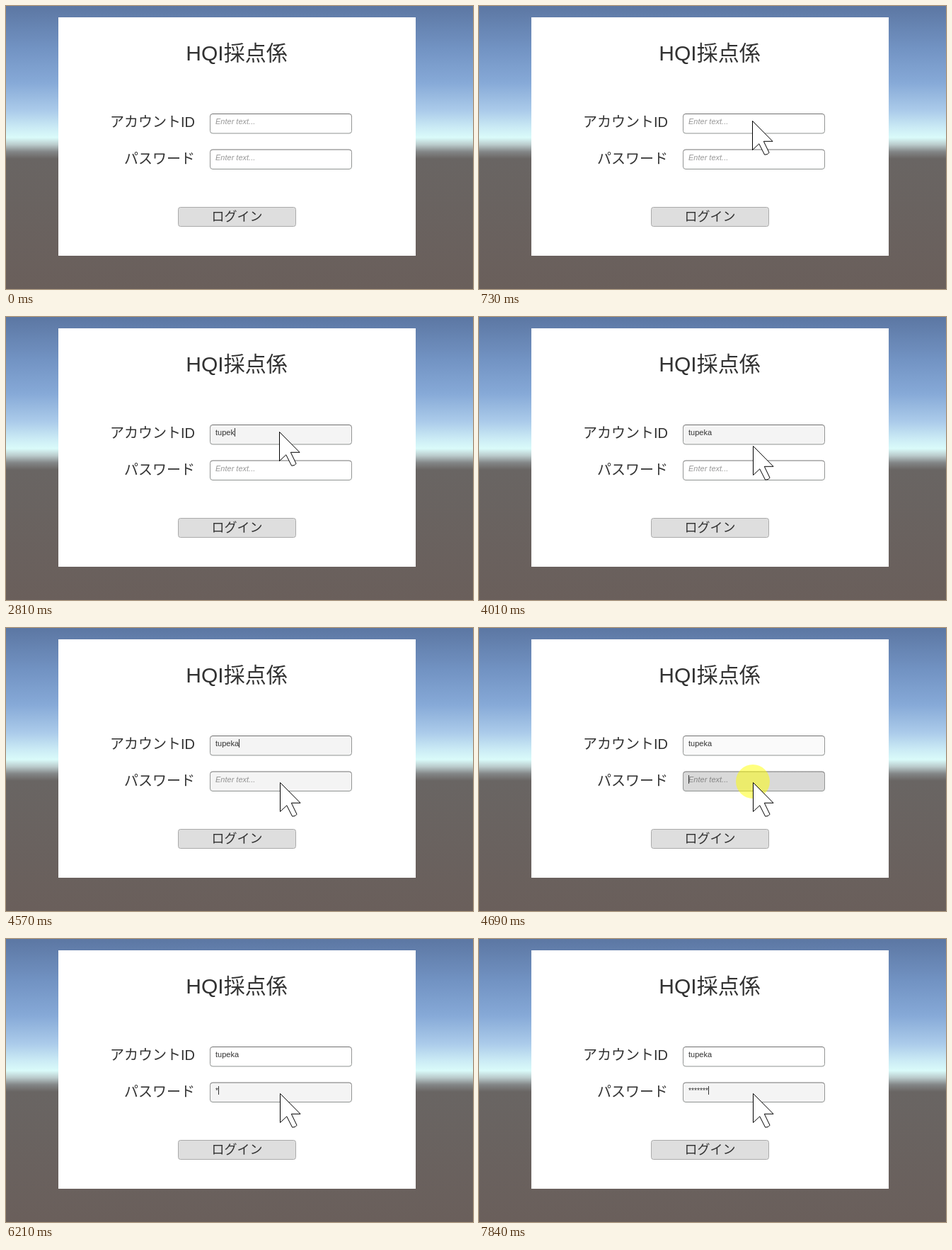
Write an HTML page that moves like this. It is 660 px wide and 400 px high and loops after 8000 ms.

```html
<!DOCTYPE html>
<html lang="ja">
<head>
<meta charset="utf-8">
<title>ログイン</title>
<style>
  html, body { margin: 0; width: 100%; height: 100%; overflow: hidden; }
  svg { display: block; width: 660px; height: 400px; }
  text { font-family: "Liberation Sans", "Noto Sans CJK JP", "Noto Sans CJK", sans-serif; fill: #323232; }
  .title { font-size: 30px; }
  .label { font-size: 20px; text-anchor: end; }
  .button { font-size: 18px; }
  .title, .button { text-anchor: middle; }
  .entry, .hint { font-size: 11px; }
  .hint { font-style: italic; fill-opacity: .5; }
  .mask { font-size: 10.3px; }
</style>
</head>
<body>
<svg viewBox="0 0 660 400">
  <defs>
    <linearGradient id="sky" x2="0" y2="1">
      <stop offset="0" stop-color="#5c77a3"/>
      <stop offset=".15" stop-color="#7293c3"/>
      <stop offset=".27" stop-color="#86a9d7"/>
      <stop offset=".37" stop-color="#abcbea"/>
      <stop offset=".43" stop-color="#cbebf5"/>
      <stop offset=".465" stop-color="#dafbfa"/>
      <stop offset=".49" stop-color="#bacbcc"/>
      <stop offset=".515" stop-color="#838687"/>
      <stop offset=".54" stop-color="#696563"/>
      <stop offset="1" stop-color="#6a5f5b"/>
    </linearGradient>
    <linearGradient id="edge" x2="0" y2="1">
      <stop offset="0" stop-color="#717171"/>
      <stop offset=".2" stop-color="#979797"/>
      <stop offset="1" stop-color="#8f9391"/>
    </linearGradient>
  </defs>

  <rect width="660" height="400" fill="url(#sky)"/>
  <rect x="74" y="16" width="505" height="337" fill="#fff"/>
  <text class="title" x="326" y="77">HQI採点係</text>
  <text class="label" x="267" y="171">アカウントID</text>
  <text class="label" x="267" y="223">パスワード</text>

  <g id="account" transform="translate(288 152)"></g>
  <g id="password" transform="translate(288 202.5)"></g>

  <rect x="243.5" y="284.5" width="166" height="27" rx="3" fill="#dedede" stroke="#aaa"/>
  <text class="button" x="326.5" y="304">ログイン</text>

  <circle id="ripple" r="24" fill="#ff0" fill-opacity=".5"/>
  <path id="pointer" d="M.5 .5V41.5L9.8 32.8L17.6 48.2Q22.5 48.5 24 45.2L16.3 29.3H29Z"
        fill="#fff" stroke="#000" stroke-linejoin="round"/>
</svg>

<script>
const LOOP = 8000;

// Every table row starts with the time at which it takes effect.
const pointerSteps = [
  [190, 510, 362], [300, 489, 326], [410, 447, 258], [520, 410, 200], [630, 391, 169],
  [730, 386, 162], [3910, 386, 165], [4010, 387, 182], [4130, 387, 203],
  [4240, 387, 214], [4350, 387, 218]
];
const clicks = [[0], [850, 386, 162], [1070], [4690, 387, 217], [4910]];

// Field rows: time, text, caret offset (none: hidden).
const name = 'tupeka';
const stars = n => '*'.repeat(n);
const fields = {
  account: {
    entry: [
      [0, ''], [960, '', 0], [1510, ''], [2050, '', 0],
      [2160, name.slice(0, 2), 9], [2270, name.slice(0, 4), 21],
      [2810, name.slice(0, 5), 27], [3360, name, 33], [3910, name],
      [4570, name, 33], [4690, name]
    ],
    fill: [[0, '#fff'], [850, '#f9f9f9'], [960, '#f4f4f4'], [4690, '#fafafa'], [4790, '#fff']]
  },
  password: {
    mask: true,
    entry: [
      [0, ''], [4690, '', 0], [5340, ''], [5890, '', 0],
      ...[[6210, 1], [6330, 2], [6530, 3], [6650, 4], [7080, 6]].map(([t, n]) => [t, stars(n), 4 * n]),
      [7630, stars(6)], [7840, stars(7), 28]
    ],
    fill: [[0, '#fff'], [4240, '#f9f9f9'], [4350, '#f4f4f4'], [4690, '#d9d9d9'],
           [4790, '#d0d0d0'], [4910, '#f4f4f4']]
  }
};

const $ = id => document.getElementById(id);
const at = (steps, t) => steps.findLast(step => step[0] <= t);
const show = (el, on) => el.setAttribute('visibility', on ? 'visible' : 'hidden');

function place(el, [, x, y] = []) {
  show(el, x !== undefined);
  if (x !== undefined) el.setAttribute('transform', `translate(${x} ${y})`);
}

for (const [id, field] of Object.entries(fields)) {
  const group = $(id);
  group.innerHTML = `
    <rect x=".5" y=".5" width="200" height="27.5" rx="3.5" stroke="url(#edge)"/>
    <text class="hint" x="8" y="15.3">Enter text...</text>
    <text class="entry ${field.mask ? 'mask' : ''}" x="8" y="15.3"></text>
    <rect y="${field.mask ? 5.5 : 5}" width="1" height="12" fill="#323232"/>`;
  [field.box, field.hint, field.text, field.caret] = group.children;
}

function draw(t) {
  for (const field of Object.values(fields)) {
    const [, value, caret] = at(field.entry, t);
    field.box.setAttribute('fill', at(field.fill, t)[1]);
    field.text.textContent = value;
    show(field.hint, !value);
    show(field.caret, caret !== undefined);
    field.caret.setAttribute('x', 8 + (caret ?? 0));
  }
  place($('ripple'), at(clicks, t));
  place($('pointer'), at(pointerSteps, t));
}

const start = performance.now();
function tick() {
  draw((performance.now() - start) % LOOP);
  requestAnimationFrame(tick);
}
tick();
</script>
</body>
</html>
```
